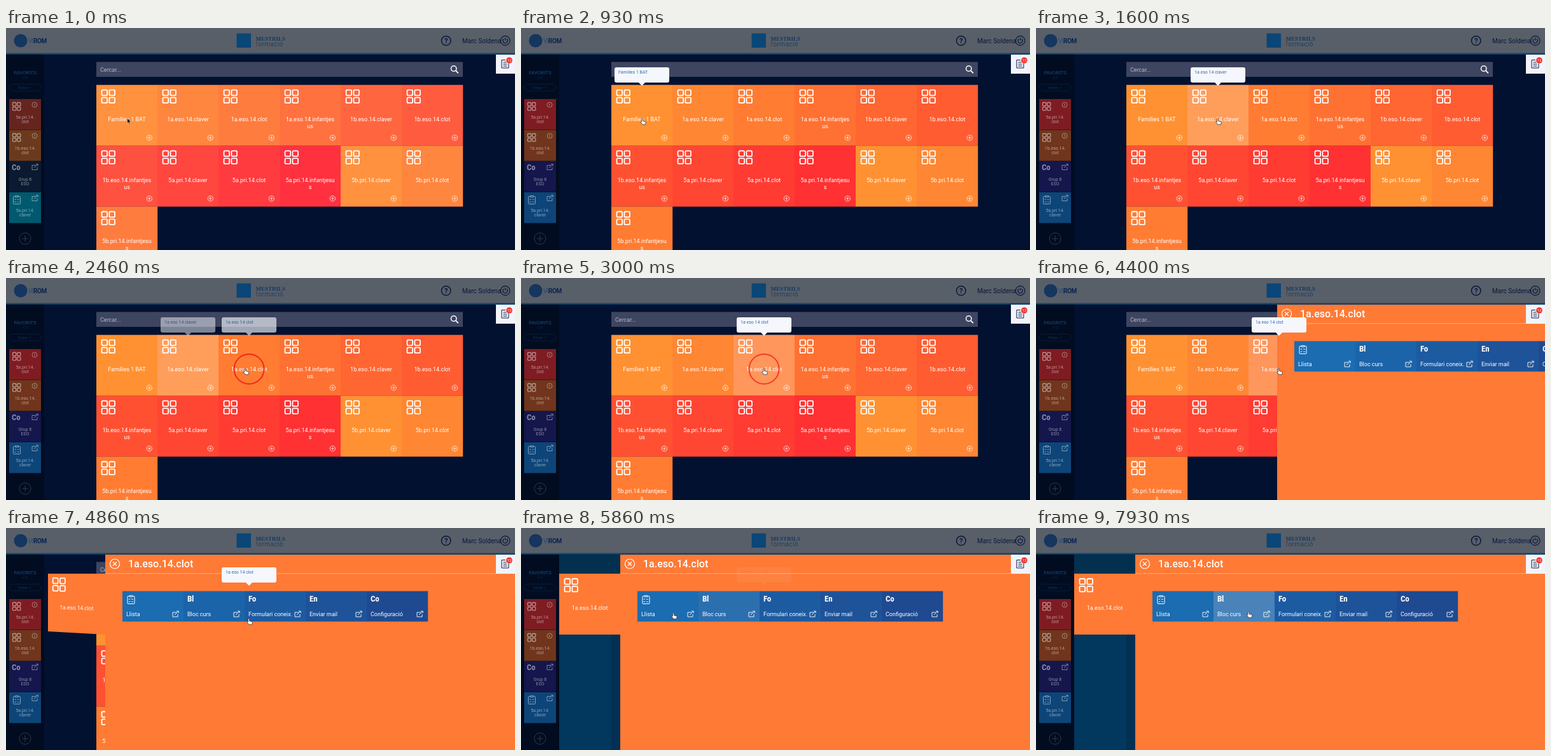
An HTML page that plays this animation: 800 by 350 pixels, repeating every 8000 ms.

```html
<!DOCTYPE html>
<html lang="ca">
<head>
<meta charset="utf-8">
<style>
html, body { margin: 0; width: 100%; height: 100%; overflow: hidden; background: #031130; }
svg { display: block; width: 800px; height: 350px; font-family: Roboto, Arial, sans-serif; }
.mid { text-anchor: middle; }
.cond { font-family: "Roboto Condensed", Roboto, sans-serif; font-weight: 700; letter-spacing: -.2px; }
.serif { font-family: "Liberation Serif", serif; }
.line { fill: none; stroke: #fff; }
</style>
</head>
<body>
<svg id="stage" viewBox="0 0 800 350"></svg>
<script>
const NAVY = '#08193f', ORANGE = '#ff7a35', LOOP = 8000;
const stage = document.getElementById('stage');

// Drawing helpers
const rect = (x, y, w, h, fill, more = '') =>
  `<rect x="${x}" y="${y}" width="${w}" height="${h}" fill="${fill}" ${more}/>`;
const text = (x, y, s, size, fill, more = '') =>
  `<text x="${x}" y="${y}" font-size="${size}" fill="${fill}" ${more}>${s}</text>`;
const line = (d, w = 1, more = '') => `<path class="line" d="${d}" stroke-width="${w}" ${more}/>`;
const ring = (x, y, r, w = 1, color = '#fff', more = '') =>
  `<circle cx="${x}" cy="${y}" r="${r}" fill="none" stroke="${color}" stroke-width="${w}" ${more}/>`;
const group = (x, y, body, more = '') => `<g transform="translate(${x} ${y})" ${more}>${body}</g>`;

// Icons
const squares = (x, y, size, w) => [0, 1, 2, 3].map(i =>
  rect(x + (i % 2) * size * 1.38, y + (i >> 1) * size * 1.38, size, size, 'none',
    `rx="${size / 5}" stroke="#fff" stroke-width="${w}"`)).join('');
const plus = (x, y, r) => ring(x, y, r, .9) +
  line(`M${x - r * .55} ${y}h${r * 1.1}M${x} ${y - r * .55}v${r * 1.1}`, .9);
const openIcon = (x, y) => group(x, y, line('M6.500 2.500H.5v7h8v-4M3.500 6.500L9.500.8M6.500.6h3.200v3', .9));
const checklist = (x, y) => group(x, y,
  line('M3 1.500H1.500q-1 0-1 1v10q0 1 1 1h9q1 0 1-1v-10q0-1-1-1H9M3.500.5h5v2h-5z', 1) +
  line('M2.300 6l1 1 1.500-2M2.300 10l1 1 1.500-2M6.500 6.300h3M6.500 10.300h3', .9));

// Group tiles
const warm = (i, blue) => `rgb(255,${Math.round(145 - 10.7 * (i % 10))},${blue})`;
const tileFace = lines => squares(8.5, 8, 8.6, 1.8) +
  lines.map((s, i) => text(48, 57 + i * 11.5, s, 9, '#fff', 'class="mid"')).join('');

const labels = [['Famílies 1 BAT']];
for (const course of ['1a.eso', '1b.eso', '5a.pri', '5b.pri'])
  labels.push([course + '.14.claver'], [course + '.14.clot'],
    course.endsWith('eso') ? [course + '.14.infantjes', 'us'] : [course + '.14.infantjesu', 's']);

const grid = labels.map((lines, i) => group(142 + 96 * (i % 6), 89.7 + 95.9 * (i / 6 | 0),
  rect(0, 0, 96.2, 96, warm(i, 50), 'class="warm"') +
  rect(0, 0, 96, 96, '#fff', `id="tile${i}" opacity="0"`) +
  tileFace(lines) + `<g opacity=".85">${plus(83.3, 83.3, 4.2)}</g>`)).join('');

const search = rect(142, 53.5, 576, 23.5, '#3e4560') +
  text(148, 69, 'Cercar...', 9, '#b4b8c6') +
  ring(703.7, 64, 4.2, 1.5) + line('M706.800 67.200l4 4', 1.8);

// Header
const header = rect(0, 0, 800, 40, '#595f68') + rect(0, 39.5, 800, 2.3, '#0d4a72') +
  '<circle cx="23" cy="20" r="10.500" fill="#14365f"/>' +
  text(35, 24, 'VI<tspan font-weight="700" fill="#0b2450">ROM</tspan>', 10, '#274a70', 'letter-spacing="-.5"') +
  rect(362.5, 8.5, 22.5, 22.5, '#0a4677') +
  text(392.5, 19.5, 'MESTRILS', 9, '#143a63', 'class="serif" font-weight="700"') +
  text(392.5, 29, '<tspan fill="#5b3a38">f</tspan>ormació', 10, '#223f5e', 'letter-spacing=".4"') +
  ring(691.7, 20, 7.3, 1.5, NAVY) + text(691.7, 24, '?', 11, NAVY, 'class="mid" font-weight="700"') +
  text(717, 24, 'Marc Soldena', 10, NAVY) +
  ring(784.7, 20, 7.3, 1.2, NAVY) +
  `<path d="M782.500 17.300a3.600 3.600 0 1 0 4.400 0M784.700 15.500v4" fill="none" stroke="${NAVY}" stroke-width="1.300"/>`;

// Favourites
const favourite = (i, lines, icon, badge) => group(5, 112 + 49 * i,
  rect(0, 0, 50, 48.5, '#000', `id="fav${i}"`) + `<g opacity=".5">${icon}${badge}` +
  lines.map((s, k) => text(25, 30.5 + 7.6 * k, s, 7, '#fff', 'class="mid"')).join('') + '</g>');
const info = ring(40, 9, 4, .8) + line('M40 7v4', .8);
const smallSquares = squares(5.5, 5.5, 5.2, 1.3);
const sidebar = rect(0, 41.8, 60, 308.2, '#020c20') +
  text(30, 72.5, 'FAVORITS', 8, '#0e508a', 'class="mid"') +
  text(30, 80, '+12', 5, '#0b3059', 'class="mid"') +
  rect(5.5, 88.500, 49, 10.5, 'none', 'rx="5" stroke="#0a2340" stroke-width=".8"') +
  text(30, 96, 'Editar ✓', 6, '#0e3459', 'class="mid"') +
  favourite(0, ['5a.pri.14.', 'clot'], smallSquares, info) +
  favourite(1, ['1b.eso.14.', 'clot'], smallSquares, info) +
  favourite(2, ['Grup 8', 'ESO'], text(4, 14, 'Co', 13, '#fff', 'class="cond"'), openIcon(35.5, 4)) +
  favourite(3, ['5a.pri.14.', 'claver'], checklist(6, 5), openIcon(35.5, 4)) +
  `<g opacity=".2">${plus(30, 332, 9)}</g>`;

// Sliding panel, drawn at its resting place
const tools = [['', 'Llista'], ['Bl', 'Bloc curs'], ['Fo', 'Formulari coneix.'], ['En', 'Enviar mail'], ['Co', 'Configuració']];
const panel = rect(156, 42, 644, 308, ORANGE) + rect(156, 71.4, 644, .9, '#ffb48c') +
  ring(171, 56.5, 7.5, 1.2) + line('M168 53.500l6 6m0-6l-6 6', 1.2) +
  text(192, 62, '1a.eso.14.clot', 16, '#fff', 'font-weight="500"') +
  tools.map(([code, name], i) => group(183 + 96 * i, 99.5,
    rect(0, 0, 96.2, 48, `rgb(${27 + i},${108 - 8.500 * i},${177 - 8 * i})`) +
    rect(0, 0, 96, 48, '#fff', `id="tool${i}" opacity="0"`) +
    (code ? text(6, 16.5, code, 13, '#fff', 'class="cond"') : checklist(7.5, 6.5)) +
    text(6, 39, name, 9, '#fff') + openIcon(78.5, 31))).join('');

const sideTile = `<polygon id="sideShape" fill="${ORANGE}"/><g id="sideFace">${tileFace(['1a.eso.14.clot'])}</g>`;
const side = rect(60, 41.8, 96, 308.2, '#02375e') + rect(142, 72, 14, 278, '#043054') +
  rect(60, 41.8, 96, 30, '#03304f');

const widget = rect(770, 42, 30, 30, '#f3f4fb') +
  `<path d="M790 56v7h-11V50.500h6M781.500 54h5M781.500 57h6M781.500 60h6" fill="none" stroke="${NAVY}" stroke-width="1"/>` +
  '<circle cx="791" cy="51" r="4.800" fill="#f0322c"/>' +
  text(791, 53.2, '12', 6, '#fff', 'class="mid"');

const tips = ['Famílies 1 BAT', '1a eso 14 claver', '1a eso 14 clot'].map((s, i) => group(147 + 96 * i, 62,
  '<path d="M3 0H83q3 0 3 3V21q0 3-3 3H48l-5 5-5-5H3q-3 0-3-3V3q0-3 3-3z" fill="#f6f7fd"/>' +
  text(6, 9.7, s, 7, '#2c6cb4'), `id="tip${i}"`)).join('');

const pointer = '<path id="arrow" d="M0 0v8.500l2-1.800 1.300 3 1.400-.6-1.300-2.900h2.700z" transform="translate(190.500 142)" fill="#111" stroke="#fff" stroke-width=".5"/>' +
  '<path id="hand" d="M-1 1.200a1 1 0 0 1 2 0v2.900l3.600.8q1.300.3 1.200 1.500l-.7 3.300h-4.800l-2.900-3.700q.2-1.500 1.600-.4z" fill="#fff" stroke="#3a2c2c" stroke-width=".8"/>';

stage.innerHTML = rect(0, 0, 800, 350, '#031130') + header + search + grid +
  `<g id="side">${side}</g><g id="sideTile">${sideTile}</g>` + sidebar +
  `<g id="panel">${panel}</g>` + widget + tips + ring(382, 143.5, 23.5, 2, '#f3261a', 'id="click"') + pointer;

// Motion
const el = id => document.getElementById(id);
const set = (id, name, value) => el(id).setAttribute(name, value);
const show = (id, on) => set(id, 'opacity', +on);
const ramp = (t, a, b) => Math.min(1, Math.max(0, (t - a) / (b - a)));
const ease = (t, a, b) => { const p = ramp(t, a, b); return p * p * (3 - 2 * p); };
const pulse = (t, a, b, c, d) => ramp(t, a, b) - ramp(t, c, d);

const favColors = [['#66241f', '#7e1c22'], ['#6b3a1c', '#70351c'], ['#0b1a30', '#15164c'], ['#00596e', '#0d4579']];
const slide = [[4860, 156], [4660, 208], [4400, 379], [4130, 564], [0, 800]];
const warmRects = document.querySelectorAll('.warm');

function draw(t) {
  const settled = t >= 130;
  favColors.forEach((pair, i) => set('fav' + i, 'fill', pair[+settled]));
  warmRects.forEach((r, i) => r.setAttribute('fill', warm(i, settled ? 50 : 63)));

  show('tip0', pulse(t, 330, 730, 1060, 1460));
  show('tip1', pulse(t, 1060, 1460, 2260, 2660));
  show('tip2', pulse(t, 2200, 2600, 5530, 5880));
  show('tile1', .2 * pulse(t, 1300, 1600, 2500, 2800));
  show('tile2', .2 * ramp(t, 2500, 2800));
  show('tool0', .2 * pulse(t, 5930, 6330, 7200, 7600));
  show('tool1', .07 * pulse(t, 5730, 5860, 5930, 6200) + .2 * ramp(t, 7200, 7600));
  show('click', pulse(t, 2330, 2460, 2860, 3600));

  const left = slide.find(([start]) => t >= start)[1];
  set('panel', 'transform', `translate(${left - 156} 0)`);
  const flat = t >= 4930;
  show('sideTile', t >= 4860);
  show('side', t >= 5130);
  set('sideShape', 'points', flat ? '60,72 156,72 156,168 60,168' : '66,72 156,72 156,168 66,163');
  set('sideFace', 'transform', flat ? 'translate(60 72)' : 'matrix(.94 .03 0 1 65.7 70.4)');

  const back = ease(t, 5530, 5948), on = ease(t, 6860, 7300);
  const x = 190.5 + 95 * ease(t, 930, 1300) + 96 * ease(t, 2000, 2541) - 160 * back + 112.5 * on;
  const y = 142.5 - 10 * back - on;
  set('hand', 'transform', `translate(${x} ${y})`);
  show('arrow', !settled);
  show('hand', settled);
}

function tick() {
  draw(performance.now() % LOOP);
  requestAnimationFrame(tick);
}
tick();
</script>
</body>
</html>
```
